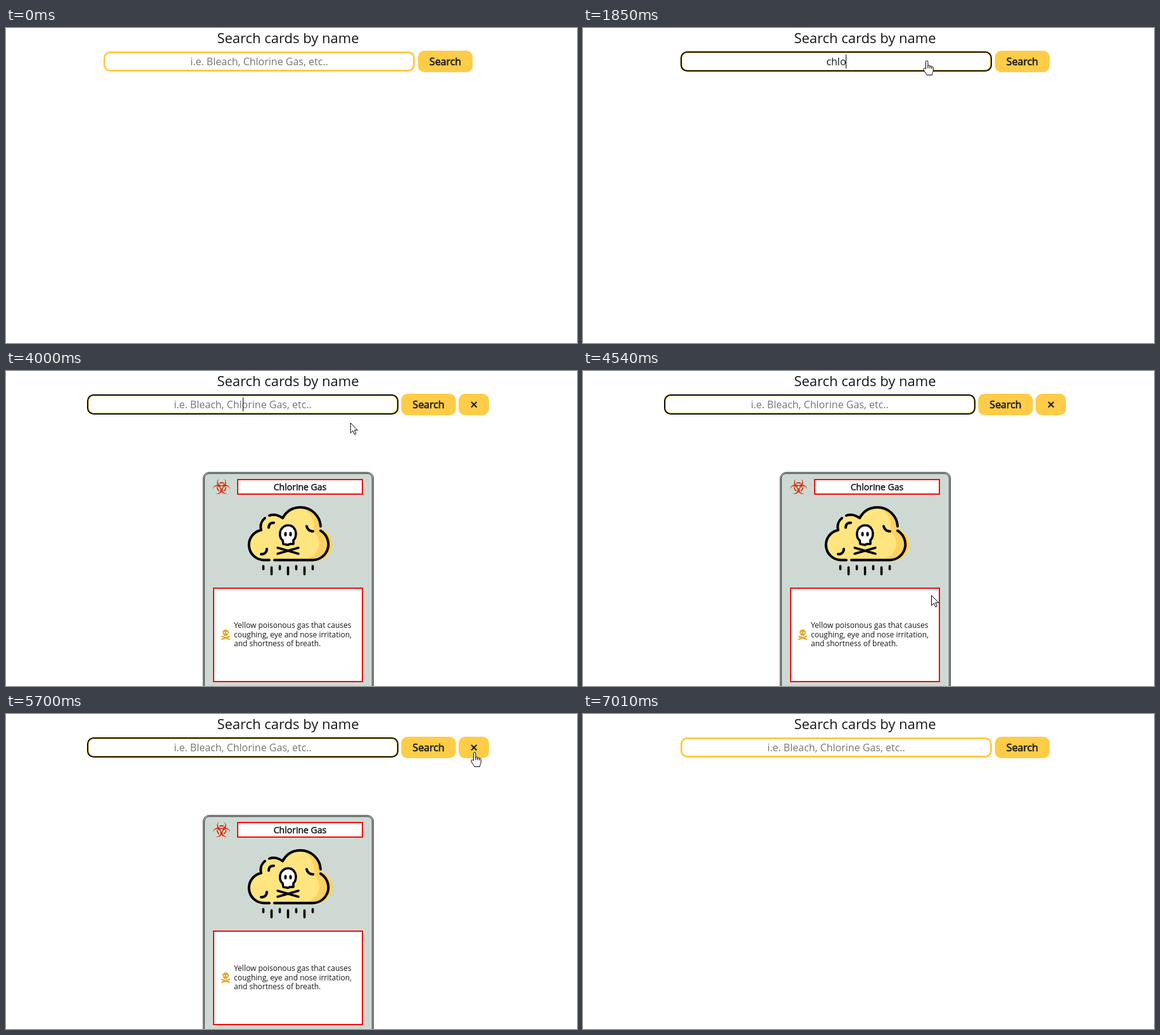
An HTML page for the animation above (7420 ms loop, 902 by 499 pixels).

```html
<!DOCTYPE html>
<html lang="en">
<head>
<meta charset="utf-8">
<title>Card search</title>
<style>
html, body { margin: 0; width: 100%; height: 100%; overflow: hidden; background: #fff; }
svg { display: block; width: 902px; height: 499px; }
text { font: 16px "Open Sans", sans-serif; fill: #15171a; white-space: pre; }
.mid { text-anchor: middle; }
.heavy { stroke: #15171a; stroke-width: .6px; }
.gold { fill: #fecc47; }
.ring { fill: none; stroke: #111; stroke-width: 2; }
.ink { fill: none; stroke: #000; stroke-width: 4; stroke-linecap: round; stroke-linejoin: round; }
.box { fill: #fff; stroke: #f00d0d; stroke-width: 2; }
.small { font-size: 12px; }
.pointer { fill: #fff; stroke: #000; stroke-linejoin: round; }
</style>
</head>
<body>
<svg viewBox="0 0 902 499">
  <defs>
    <path id="horn" d="M-3-12.6A6.8 6.8 0 1 0 3-12.6A5.4 5.4 0 1 1-3-12.6Z"/>
  </defs>

  <text class="mid" x="445.5" y="24" style="font-size:22px">Search cards by name</text>

  <g id="field">
    <rect x="155.5" y="38.5" width="489" height="29" rx="9" fill="#fff" stroke="#fecc47" stroke-width="3"/>
    <rect id="focus" class="ring" x="155" y="38" width="490" height="30" rx="9.5"/>
    <text id="hint" class="mid" x="400" y="59" style="fill:#757575">i.e. Bleach, Chlorine Gas, etc..</text>
    <text id="typed" class="mid" x="400" y="59"></text>
    <rect id="caret" y="42" width="1" height="22"/>
  </g>
  <g id="search">
    <rect class="gold" x="650.7" y="36" width="86.5" height="34" rx="10"/>
    <text class="mid heavy" x="694" y="59">Search</text>
  </g>

  <g id="result">
    <rect class="gold" x="715" y="36" width="48" height="34" rx="10"/>
    <path d="M735 49l8.5 8.5m0-8.5l-8.5 8.5" fill="none" stroke="#15171a" stroke-width="2"/>
    <rect id="closeRing" class="ring" x="715" y="36" width="48" height="34" rx="10"/>

    <g fill="#cfd9d3" stroke="#24292d">
      <rect x="311.5" y="160.5" width="269" height="380" rx="9.5"/>
      <rect x="313.5" y="162.5" width="265" height="376" rx="7.5"/>
    </g>

    <g transform="translate(340.5 184) scale(1.08)" fill="#d63814">
      <use href="#horn"/>
      <use href="#horn" transform="rotate(120)"/>
      <use href="#horn" transform="rotate(240)"/>
      <circle r="6.4" fill="none" stroke="#d63814" stroke-width="1.7" stroke-dasharray="6.7" stroke-dashoffset="-3.35" transform="rotate(-30)"/>
      <circle r="1.8" fill="#cfd9d3"/>
    </g>
    <rect class="box" x="366" y="172" width="197" height="23"/>
    <text class="mid heavy" x="464.5" y="189" style="font-size:14px;stroke-width:.5px">Chlorine Gas</text>

    <g id="picture">
      <path fill="#fee580" d="M407 299A24 24 0 0 1 403 251.500C401 233 422 222 437 233C450 210 496 210 497 250A25 25 0 0 1 484 299Z"/>
      <path fill="#fdd160" d="M466 216C482 216 497 230 497 250A25 25 0 0 1 484 299H473C496 293 502 267 485 253C490 240 483 224 466 216Z"/>
      <path class="ink" d="M416 299.500H407A24 24 0 0 1 403 252C401 244 404 237 409 233M416 229C424 226 432 229 437 233C443 222 453 216 465 216C482 216 496 229 497 246M497 253A25 25 0 0 1 484 299.500H424"/>
      <path class="ink" d="M415 248C415 243 418 240 423 240.500M475 246C476 251 480 254 485 254M403 290C408 291 412 287 412 282"/>
      <path class="ink" style="fill:#fff;stroke-width:3.600" d="M437 268C431 264 432 253 436 249C441 243 451 243 455 249C459 253 459 264 454 268V274H449L445 275.500L438 274Z"/>
      <path class="ink" d="M441.500 257v3M449.500 257v3"/>
      <path class="ink" style="stroke-width:3.400" d="M429 280L462 289.500M429 289.500L462 280"/>
      <path class="ink" style="stroke-width:3.600" d="M406.500 309v5m26-5v5m26-5v5m26-5v5M419.500 311v11m26-11v11m26-11v11"/>
    </g>

    <rect class="box" x="328" y="344" width="235" height="148"/>
    <g fill="#e5a621">
      <ellipse cx="347" cy="414" rx="5" ry="4.600"/>
      <rect x="344" y="415" width="6" height="4.500" rx="1"/>
      <path d="M341 420.500L353 425M341 425L353 420.500" stroke="#e5a621" stroke-width="2.200" stroke-linecap="round"/>
      <path d="M345 414.500h.01M349 414.500h.01" stroke="#fff" stroke-width="2.400" stroke-linecap="round"/>
    </g>
    <text class="small" x="360" y="407">Yellow poisonous gas that causes</text>
    <text class="small" x="360" y="422">coughing, eye and nose irritation,</text>
    <text class="small" x="360" y="436">and shortness of breath.</text>
  </g>

  <g id="mouse" class="pointer">
    <path id="arrow" d="M.5 .5V16.500L4.300 13L6.800 18.800L9.300 17.700L6.800 12H11.800Z"/>
    <g id="hand">
      <path d="M-1.500 1.500a1.700 1.700 0 0 1 3.400 0V8.500c0-2 3-2 3 0V9.500c0-2 2.800-1.800 2.800 0V10.500c0-1.800 2.600-1.600 2.600 .3V15c0 3-1.500 4-2 7.500H0c-.5-2-3-4-5-8.500c-.8-2.500 1.600-3.400 3.500-1Z"/>
      <path fill="none" d="M1.900 8v4M4.900 9v3M7.700 10v2.500"/>
    </g>
  </g>
</svg>
<script>
const LOOP = 7420, FOCUS = 840, FOUND = 3020, LOADED = 3100, PRESS = 6120, CLEAR = 6260;
const el = id => document.getElementById(id);
const show = (id, on) => el(id).style.display = on ? "" : "none";
const move = (id, x, y) => el(id).setAttribute("transform", `translate(${x} ${y})`);

const keys = [
  [1580, "c"], [1650, "ch"], [1710, "chl"], [1850, "chlo"],
  [2300, "chlor"], [2370, "chlori"], [2430, "chlorine"],
  [2570, "chlorine "], [2690, "chlorine g"], [2790, "chlorine ga"], [2900, "chlorine gas"]
];
const path = [
  [0, 869, 480], [780, 543, 52], [3860, 543, 52], [4540, 550, 355], [4640, 552, 353],
  [5360, 723.5, 84], [5700, 740, 61], [6470, 740, 61], [7010, 788, 462]
];

function pointerAt(t) {
  // The pointer moves in ticks of 68 ms.
  const q = Math.max(0, 3930 + 68 * Math.floor((t - 3925) / 68));
  let i = path.findIndex(p => p[0] > q);
  if (i < 0) i = path.length - 1;
  const [t0, x0, y0] = path[i - 1], [t1, x1, y1] = path[i];
  const k = Math.min(1, (q - t0) / (t1 - t0));
  const e = (1 - Math.cos(Math.PI * k)) / 2;
  return [x0 + (x1 - x0) * e, y0 + (y1 - y0) * e];
}

function draw(t) {
  const found = t >= FOUND && t < CLEAR;
  const focused = t >= FOCUS && t < PRESS;
  const key = found ? null : keys.filter(k => k[0] <= t).pop();
  const word = key && t < FOUND ? key[1] : "";
  const shift = found ? -26 : 0;

  move("field", shift, 0);
  move("search", found ? -26.5 : 0, 0);
  show("focus", focused);
  show("hint", !word);
  el("typed").textContent = word;

  const blinkStart = found ? 2980 : key ? key[0] : 800;
  const lit = Math.floor((t - blinkStart) / 500) % 2 === 0;
  show("caret", focused && lit && t < 5480);
  const half = word ? el("typed").getComputedTextLength() / 2 : 0;
  el("caret").setAttribute("x", Math.floor(400 + half));

  show("result", found);
  show("picture", t >= LOADED);
  show("closeRing", t >= PRESS);

  const [x, y] = pointerAt(t);
  const over = (a, b) => x >= a && x < b && y >= 36 && y < 70;
  const hand = over(154 + shift, 646 + shift) || over(651 + shift, 737 + shift) || found && over(715, 763);
  show("mouse", t >= 70 && t < 7010);
  show("hand", hand);
  show("arrow", !hand);
  move("mouse", x, y);
}

const start = performance.now();
function tick() {
  draw((performance.now() - start) % LOOP);
  requestAnimationFrame(tick);
}
tick();
</script>
</body>
</html>
```
